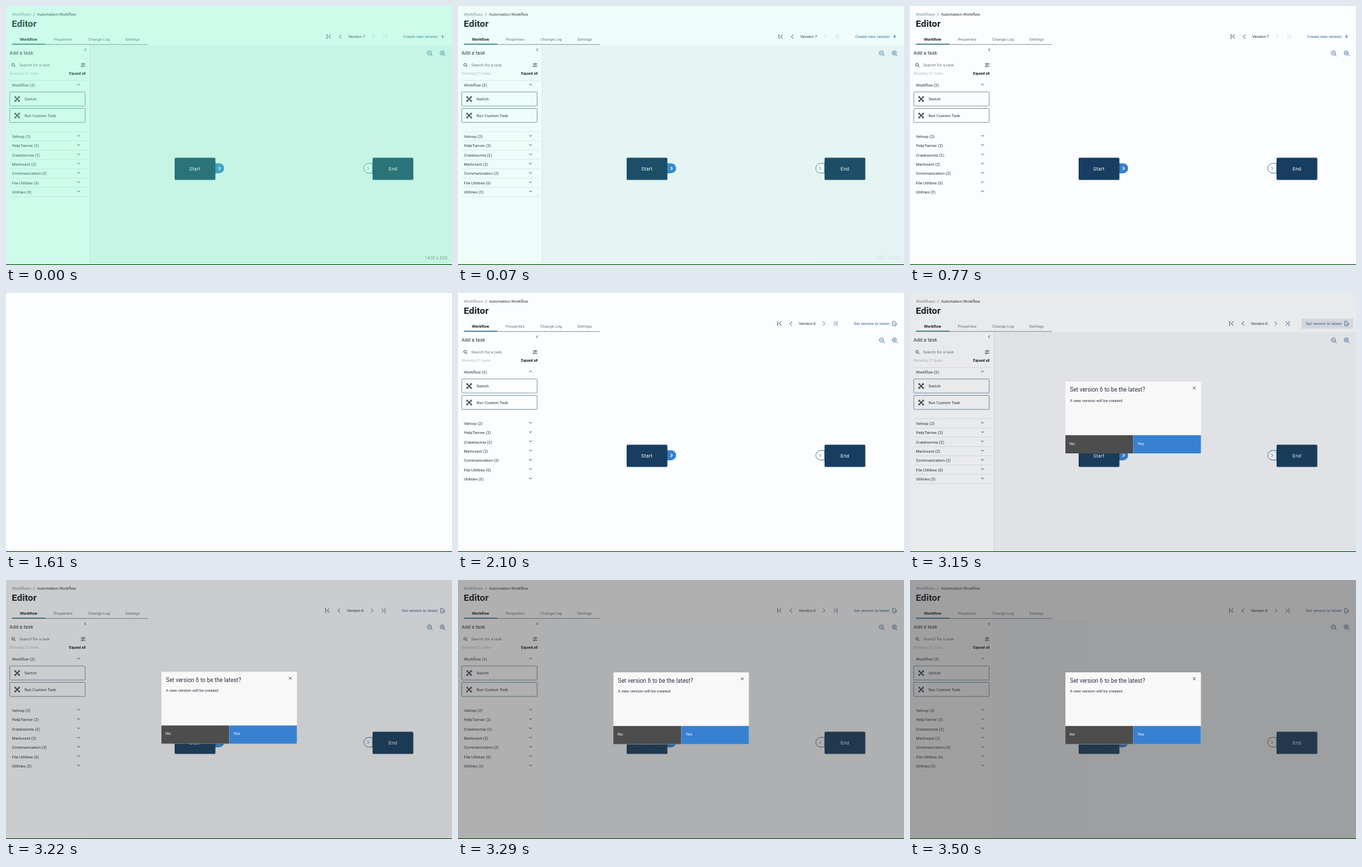
Recreate the animation shown at these times as an HTML page. Size 640 by 373 pixels, loop 3570 ms.

```html
<!DOCTYPE html>
<html lang="en">
<head>
<meta charset="utf-8">
<title>Workflow editor</title>
<style>
  html, body { margin: 0; width: 100%; height: 100%; overflow: hidden; background: #fcfdff; }
  svg { display: block; width: 100vw; height: 100vh; }
  text { font: 5.85px Roboto, "Open Sans", sans-serif; fill: #2b3440; white-space: pre; }
  .bold { font-weight: 600; fill: #161c24; }
  .muted { fill: #6c7580; }
  .pale { font-size: 5.35px; fill: #b4bac2; }
  .blue { fill: #3a6596; }
  .white { fill: #fff; }
  .node { font-size: 6.8px; letter-spacing: .3px; fill: #fff; text-anchor: middle; }
  .line { fill: none; stroke: #2b3440; stroke-width: .8; }
  .link { stroke: #3a6596; }
  .off { stroke: #cdd2d9; }
</style>
</head>
<body>
<svg viewBox="0 0 640 373" preserveAspectRatio="none">
  <defs>
    <g id="task" class="line">
      <path d="M-2.6-2.6 2.6 2.6M2.6-2.6-2.6 2.6" stroke-width="1"/>
      <path d="M-3.6-3.6h1.8v1.8h-1.8zM1.8-3.6h1.8v1.8h-1.8zM-3.6 1.8h1.8v1.8h-1.8zM1.8 1.8h1.8v1.8h-1.8z"/>
      <circle r="1.2" fill="#2b3440"/>
    </g>
    <g id="lens" class="line link">
      <circle cx="-.7" cy="-.7" r="3"/>
      <path d="M1.5 1.5 4 4M-2.2-.7H.8"/>
    </g>
  </defs>
  <rect width="640" height="373" fill="#fcfdff"/>

  <g id="page">
    <g id="tint">
      <rect x="120.5" y="56.5" width="520" height="316" fill="#f2f4f8"/>
      <path id="rules" stroke="#dde1e7" stroke-width=".7"/>
    </g>

    <text x="8.5" y="13.7" fill="#73879e" style="fill:#73879e">Workflows</text>
    <text x="39" y="13.7">/</text>
    <text x="44.5" y="13.7">Automation Workflow</text>
    <text x="8.3" y="30.3" class="bold" style="font-size:13.5px">Editor</text>

    <text x="20" y="50" class="bold">Workflow</text>
    <text x="68.5" y="50" class="muted">Properties</text>
    <text x="118" y="50" class="muted">Change Log</text>
    <text x="171" y="50" class="muted">Settings</text>
    <path d="M8.5 55.4H203.5" stroke="#8a979f" stroke-width=".9"/>
    <path d="M8.5 55H56.5" stroke="#4a8494" stroke-width="1.5"/>

    <text x="5" y="70.2" style="font-size:7.2px">Add a task</text>
    <path class="line" d="M114.6 61l-1.8 2 1.8 2"/>
    <g class="line">
      <circle cx="10.2" cy="84.5" r="1.9"/>
      <path d="M11.6 86l1.9 2M107.5 83.5h2.5m2 0h2M107.5 86.7h1m2 0h3.5"/>
      <circle cx="111" cy="83.5" r="1"/>
      <circle cx="109.4" cy="86.7" r="1"/>
    </g>
    <text x="19" y="87.2" class="muted">Search for a task</text>
    <text x="5" y="99.2" class="pale">Showing 21 tasks</text>
    <text x="90.5" y="99" class="bold" style="font-size:5.15px">Expand all</text>

    <text x="8.5" y="116.2">Workflow (2)</text>
    <path class="line" d="M102 114.2l2-2 2 2"/>
    <g fill="#fcfdff" stroke="#7f97a8" stroke-width=".9">
      <rect x="5.4" y="123.8" width="108.2" height="20.2" rx=".8"/>
      <rect x="5.4" y="147.5" width="108.2" height="20.2" rx=".8"/>
    </g>
    <use href="#task" x="16" y="134"/>
    <use href="#task" x="16" y="157.8"/>
    <text x="26.5" y="136.2">Switch</text>
    <text x="26.5" y="160">Run Custom Task</text>
    <g id="groups"></g>

    <g id="nav">
      <path class="line" d="M460.8 40.5v7M466 41l-3 3 3 3M481.3 41l-3 3 3 3"/>
      <path id="next" class="line" d="M525.5 41l3 3-3 3M541 41l3 3-3 3M545.8 40.5v7"/>
      <text id="version" x="491" y="46.2"></text>
    </g>
    <rect id="hover" x="562" y="37" width="74" height="14.5" fill="#e4e7ec"/>
    <g id="create">
      <text x="570" y="46.2" class="blue">Create new version</text>
      <path class="line link" d="M624.2 44h4.6M626.5 41.7v4.6"/>
    </g>
    <g id="restore">
      <text x="568" y="46.2" class="blue">Set version to latest</text>
      <path class="line link" d="M628.2 42.8v-.6l-1.4-1.4h-3v6.4h4.4v-.8M626 44.6h3.6m-1.2-1.3 1.3 1.3-1.3 1.3"/>
    </g>

    <use href="#lens" x="608.3" y="68.3"/>
    <use href="#lens" x="626.8" y="68.3"/>
    <path class="line link" d="M626.1 66.1v3"/>

    <path d="M300 226.5h5.8a7.2 7.2 0 0 1 0 14.4H300z" fill="#3781cc"/>
    <path class="line" d="M305.3 231.6l2.2 2.2-2.2 2.2" style="stroke:#fff;stroke-width:1.1"/>
    <path d="M526 226.8h-5.6a6.9 6.9 0 0 0 0 13.8h5.6z" fill="#fcfdff" stroke="#4d7aa3" stroke-width=".9"/>
    <path class="line link" d="M518.5 231.6l2.2 2.2-2.2 2.2"/>
    <rect x="242" y="218.5" width="58.5" height="32" rx="1.5" fill="#173d60"/>
    <rect x="526" y="218.5" width="58.5" height="32" rx="1.5" fill="#173d60"/>
    <text x="271.2" y="236.9" class="node">Start</text>
    <text x="555.2" y="236.9" class="node">End</text>
  </g>

  <g id="capture">
    <rect width="640" height="373" fill="rgb(92,248,183)" fill-opacity=".29"/>
    <text x="600.5" y="365.2" style="font-size:6.7px;fill:#86a79b">1420 x 828</text>
  </g>

  <rect id="shade" width="640" height="373" fill="#333"/>
  <g id="modal">
    <rect x="223" y="133" width="194.5" height="103.5" rx="1" fill="#f8f8f9"/>
    <path d="M223 210.3h97.3v26.2H224a1 1 0 0 1-1-1z" fill="#4d4d4d"/>
    <path d="M320.3 210.3h97.2v25.2a1 1 0 0 1-1 1h-96.2z" fill="#3881d0"/>
    <text x="229.5" y="147.6" style="font-size:8.25px">Set version 6 to be the latest?</text>
    <path class="line" d="M406 140.4l3.8 3.8m0-3.8-3.8 3.8" stroke-width="1"/>
    <text x="229.5" y="162.3">A new version will be created</text>
    <text x="229" y="224.2" class="white">No</text>
    <text x="326.5" y="224.2" class="white">Yes</text>
  </g>
  <rect y="372" width="640" height="1" fill="#0b5a0b"/>
</svg>
<script>
const LOOP = 3570, STEP = 70;
const $ = id => document.getElementById(id);
const fade = (id, v) => $(id).setAttribute('opacity', v);

const groups = ['Velnop (2)', 'HelpTarrow (2)', 'Crateloomia (2)', 'Marlovant (2)',
  'Communication (2)', 'File Utilities (6)', 'Utilities (3)'];
const rowY = i => 187.6 + i * 13.35;
$('groups').innerHTML = groups.map((name, i) =>
  `<text x="8.5" y="${rowY(i) + 2.4}">${name}</text>
   <path class="line" d="M102 ${rowY(i) - 1.8}l2 2 2-2"/>`).join('');
$('rules').setAttribute('d', 'M5 107.3H117M120.5 56.5V372' +
  [...groups, ''].map((_, i) => `M5 ${rowY(i) - 6.6}H117`).join(''));

// Linear interpolation through [time, value] points
function track(t, points) {
  let [t0, v0] = points[0];
  for (const [t1, v1] of points) {
    if (t < t1) return t <= t0 ? v0 : v0 + (v1 - v0) * (t - t0) / (t1 - t0);
    [t0, v0] = [t1, v1];
  }
  return v0;
}

function draw(now) {
  const t = Math.floor(now % LOOP / STEP) * STEP;
  const old = t >= 1960;

  fade('page', t >= 1470 && !old ? 0 : 1);
  fade('capture', track(t, [[0, 1], [70, .3], [140, .1], [210, .03], [280, 0]]));
  fade('tint', t < 280 ? 1 : t < 2870 ? 0 : t < 3220 ? 1 : t < 3360 ? .1 : .4);

  $('version').textContent = old ? 'Version 6' : 'Version 7';
  $('nav').setAttribute('transform', `translate(${old ? -2 : 0})`);
  $('next').setAttribute('class', old ? 'line link' : 'line off');
  fade('create', old ? 0 : 1);
  fade('restore', old ? 1 : 0);
  fade('hover', t >= 2870 && t < 3220 ? 1 : 0);

  fade('shade', track(t, [[3010, 0], [3080, .03], [3150, .09], [3220, .245], [3290, .38], [3360, .46]]));
  fade('modal', track(t, [[3010, 0], [3080, .5], [3150, 1]]));
  const drop = track(t, [[3080, -10.5], [3150, -5.6], [3220, -.8], [3290, 0]]);
  $('modal').setAttribute('transform', `translate(0 ${drop})`);
}

const start = performance.now();
function tick() {
  draw(performance.now() - start);
  requestAnimationFrame(tick);
}
tick();
</script>
</body>
</html>
```
